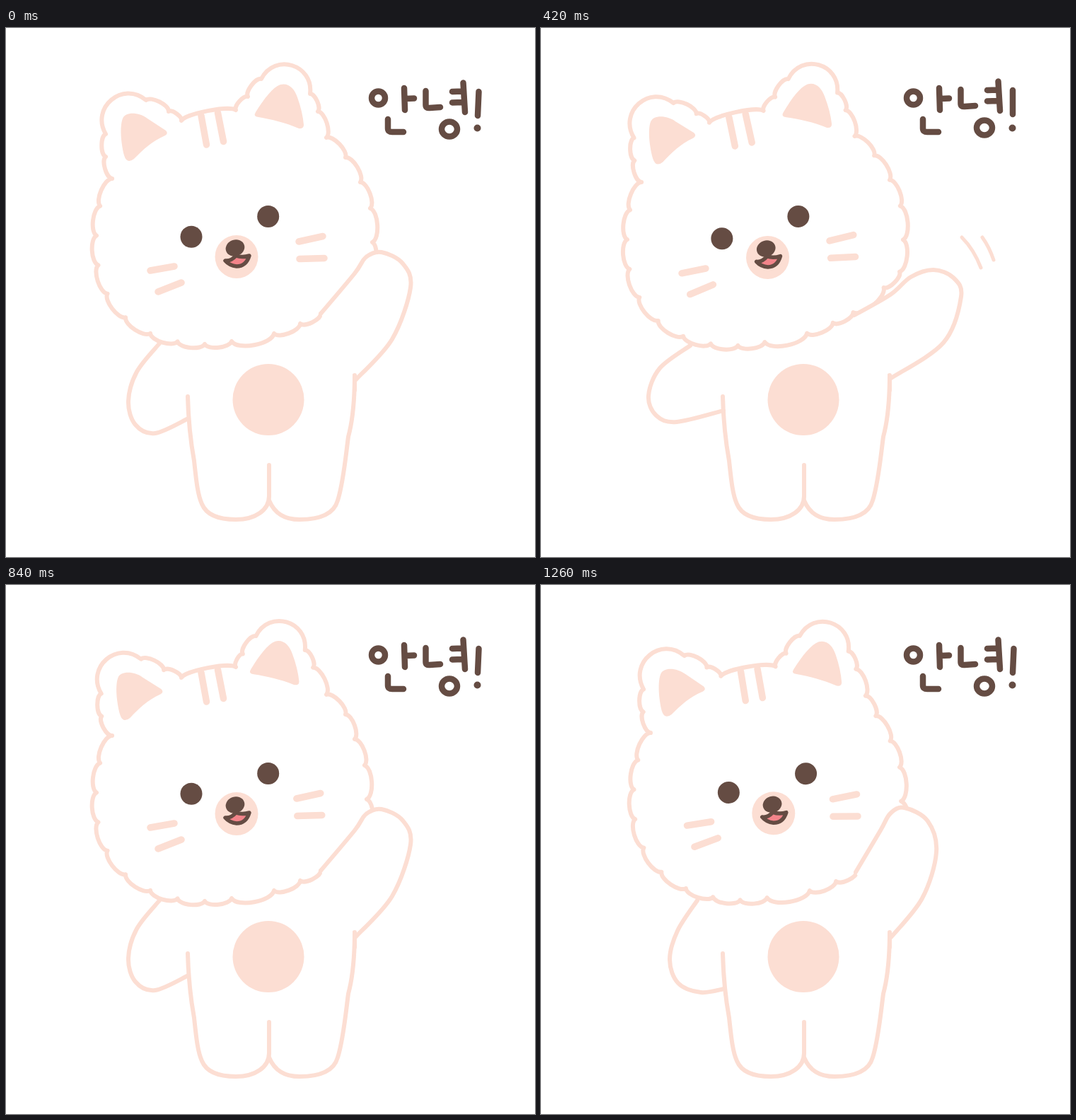
These frames come from a looping animation (748 by 748 pixels, 1400 ms). An HTML page:

```html
<!DOCTYPE html>
<html lang="ko">
<head>
<meta charset="utf-8">
<style>
html, body { margin: 0; width: 100%; height: 100%; overflow: hidden; background: #fff; }
svg { display: block; width: 100%; height: 100%; fill: none; stroke: #fcded3; stroke-width: 6; stroke-linecap: round; stroke-linejoin: round; }
.solid { fill: #fcded3; stroke: none; }
.bold { stroke-width: 9.5; }
.white { fill: #fff; }
.dark { fill: #654c43; stroke: none; }
.ink { stroke: #654c43; stroke-width: 8.5; }
</style>
</head>
<body>
<svg viewBox="0 0 748 748" role="img" aria-label="안녕!">
  <path id="leftArm"/>
  <path d="M257,521C258,560 262,590 266,612C269,640 271,660 277,673C284,690 305,695 325,695C352,695 373,682 372,660V618"/>
  <path d="M372,668C380,687 394,695 415,695C445,695 464,686 469,668C477,643 480,608 484,578C491,552 493,525 493,491"/>
  <circle class="solid" cx="371" cy="525.5" r="50.5"/>
  <path id="outline" class="white"/>
  <g id="ears" class="solid">
    <path d="M167,180C162,160 161,138 165,128C169,118 188,119 200,128L226,145Q230,149 225,152C205,161 195,171 181,185Q171,193 167,180Z"/>
    <path d="M353,119C365,100 377,84 388,80C400,77 408,86 412,98C417,112 420,125 421,137Q421,143 414,142C396,134 375,129 357,126Q349,125 353,119Z"/>
  </g>
  <g id="face">
    <path class="bold" d="M276,124L283.5,165M299.5,120L307.5,160.5M204,343L238,337M215,373L248,360"/>
    <path id="whiskers" class="bold" d="M414,302L448,294.5M415,326.5L450,325.5"/>
    <circle class="dark" cx="262" cy="295.3" r="15.5"/>
    <circle class="dark" cx="370.7" cy="266.5" r="15.5"/>
    <circle class="solid" cx="326" cy="323.5" r="30.5"/>
    <path d="M310,329Q318,330 325,322Q334,325 344,322C341,332 335,337 326,337Q316,336 310,329Z" fill="#f2848a" stroke="#654c43" stroke-width="5.5"/>
    <ellipse class="dark" cx="324" cy="311" rx="13.5" ry="11.5" transform="rotate(-18 324 311)"/>
  </g>
  <path id="rightArm" class="white"/>
  <path d="M493,491V512"/>
  <path id="swish" stroke-width="5"/>
  <g class="ink">
    <ellipse cx="526.5" cy="99" rx="9.5" ry="9.5"/>
    <path d="M563,85L564,116M565,100L577,99.5M540,129V142Q540,147 546,147H562"/>
    <g id="second">
      <path d="M593.5,89V109Q593.5,113.5 599,113L614,112M646.5,77.5L649,119M631,90L645,89.5M631,105.5L646,105"/>
      <ellipse cx="627" cy="143" rx="11" ry="10.5"/>
    </g>
    <path id="bang"/>
    <circle class="dark" cx="666.5" cy="141.5" r="5"/>
  </g>
</svg>
<script>
const $ = id => document.getElementById(id);

// Spline points of each arm: raised, at rest, stretched out
const leftArm = [
  [221,446, 193,489, 182,530, 194,563, 226,576, 259,571],
  [217,446, 185,486, 173,528, 183,561, 211,573, 258,552],
  [211,449, 168,481, 152,520, 163,548, 192,557, 258,541]
];
const rightArm = [
  [445,406, 480,347, 494,323, 514,315, 547,334, 559,378, 539,443, 495,498],
  [445,404, 493,347, 509,324, 531,317, 561,333, 572,367, 546,440, 495,497],
  [443,406, 494,377, 523,352, 555,342, 583,353, 594,380, 569,445, 495,495]
];

// Pose per step: -1 raised, 0 at rest, 1 stretched out; the ears trail behind
const swing = [0, .35, .7, 1, .7, .35, 0, -1, -1, -1];
const earSwing = [0, .35, .7, 1, .7, .7, .7, -.6, -1, -.6];
const swishes = {
  2: 'M567,277Q596,291 615,327M608,280Q624,294 634,319',
  3: 'M595,296Q612,313 622,339M624,296Q634,310 640,328'
};

// Cusps between the fur tufts, clockwise
const fur = [
  ['crown', 248,131, 325,116],
  ['ear', 342,97, 361,72, 430,93, 441,118],
  ['temple', 453,155, 480,183],
  ['cheek', 501,218, 515,255, 518,303],
  ['jaw', 512,348, 489,370, 445,404, 416,418, 379,432, 319,443],
  ['mane', ...mane()],
  ['ear', 141,182, 141,150, 198,102, 230,118]
].flatMap(([part, ...p]) => pairs(p).map(([x, y]) => ({ part, x, y })));

// Evenly spaced tufts on a superellipse
function mane() {
  return Array.from({ length: 9 }, (_, i) => {
    const a = (93.5 + 14.8 * i) * Math.PI / 180, c = Math.cos(a), s = Math.sin(a), p = 2.35;
    const r = (Math.abs(c / 162) ** p + Math.abs(s / 147) ** p) ** (-1 / p);
    return [290 + r * c, 300 + r * s];
  }).flat();
}

function pairs(flat) {
  return flat.flatMap((v, i) => i % 2 ? [] : [[v, flat[i + 1]]]);
}

function mix(keys, s) {
  const [a, b] = s < 0 ? [keys[0], keys[1]] : [keys[1], keys[2]], f = s < 0 ? s + 1 : s;
  return a.map((v, k) => v + (b[k] - v) * f);
}

// Catmull-Rom curve through the points
function spline(flat) {
  const p = pairs(flat), at = i => p[Math.max(0, Math.min(i, p.length - 1))];
  const lean = (i, sign) => p[i].map((v, k) => v + sign * (at(i + 1)[k] - at(i - 1)[k]) / 6);
  return 'M' + p[0] + p.slice(1).map((q, i) => `C${lean(i, 1)} ${lean(i + 1, -1)} ${q}`).join('');
}

const pose = s => ({ angle: -1.2 * s - .15 * s * s, shift: -1.5 * s - s * s });
const tilt = ({ angle, shift }) => `translate(${shift}) rotate(${angle} 365 450)`;

function turn({ x, y }, { angle, shift }) {
  const r = angle * Math.PI / 180, c = Math.cos(r), s = Math.sin(r);
  x -= 365; y -= 450;
  return [365 + shift + x * c - y * s, 450 + x * s + y * c];
}

function furPath(head, ear, tuck, n) {
  const pts = fur.map(f => {
    const [x, y] = turn(f, f.part === 'ear' ? ear : head);
    const tucked = f.part === 'cheek' || f.part === 'temple' && f.x > 460 && n > 6;
    return [x - (tucked ? tuck : 0), y];
  });
  return 'M' + pts[0] + pts.map(([x, y], i) => {
    const [u, v] = pts[(i + 1) % pts.length], dx = u - x, dy = v - y;
    const bulge = Math.hypot(dx, dy) < 65 ? .24 : fur[i].part === 'ear' ? .57 : .11;
    const at = t => [x + dx * t + dy * bulge, y + dy * t - dx * bulge];
    return `C${at(.1)} ${at(.9)} ${u},${v}`;
  }).join('') + 'Z';
}

function draw(n) {
  const s = swing[n], head = pose(s), ear = pose(earSwing[n]);
  const tuck = 4 * Math.max(0, Math.min(n - 4, 3));
  const set = (id, name, value) => $(id).setAttribute(name, value);
  set('leftArm', 'd', spline(mix(leftArm, s)));
  set('rightArm', 'd', spline(mix(rightArm, s)));
  set('outline', 'd', furPath(head, ear, tuck, n));
  set('ears', 'transform', tilt(ear));
  set('face', 'transform', tilt(head));
  set('whiskers', 'transform', `translate(${-tuck * .4})`);
  set('swish', 'd', swishes[n] || '');
  set('second', 'transform', `translate(0 ${n === 2 || n === 3 ? -2 : 0})`);
  set('bang', 'd', n > 1 && n < 6 ? 'M667,88V122' : 'M668.5,90L667,124');
}

let shown = -1;
function tick() {
  const n = Math.floor(performance.now() % 1400 / 140);
  if (n !== shown) draw(shown = n);
  requestAnimationFrame(tick);
}
tick();
</script>
</body>
</html>
```
